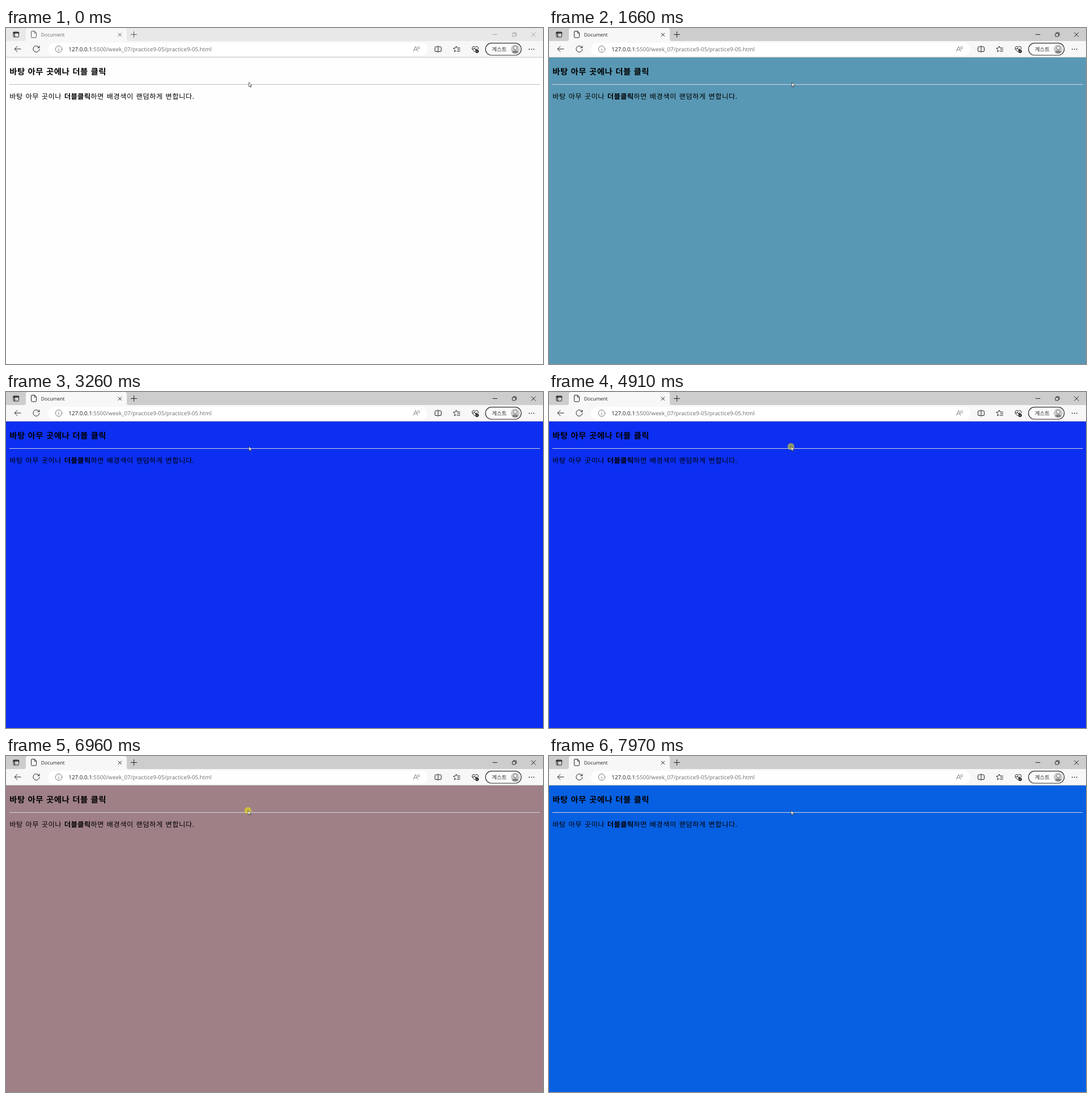
An HTML page that plays this animation: 947 by 592 pixels, repeating every 9.42 s.

```html
<!DOCTYPE html>
<html lang="ko">
<head>
<meta charset="utf-8">
<title>Document</title>
<style>
html, body { margin: 0; width: 100%; height: 100%; overflow: hidden; background: #fff; }
svg { display: block; width: 947px; height: 592px; }
text { font-family: "Open Sans", "Noto Sans", sans-serif; text-rendering: geometricPrecision; }
.ko { font-family: "Noto Sans CJK KR", "Noto Sans CJK", sans-serif; fill: #000; }
.line { fill: none; stroke: #222; stroke-width: 1; stroke-linecap: round; stroke-linejoin: round; }
#page, #rule, #bar, #label, #tabIcons, #buttons, #dot, #pointer {
  animation: 9420ms step-end infinite;
}

/* Page colour changes when the second click is released */
#page { animation-name: page; }
@keyframes page {
  0% { fill: #fefefe; }
  8.383% { fill: #3b5ba4; }
  17.619% { fill: #5998b5; }
  34.604% { fill: #0c2ff2; }
  54.986% { fill: #15cf1c; }
  64.859% { fill: #9f8087; }
  75.369% { fill: #6f8a8c; }
  84.604%, 100% { fill: #0760e2; }
}
#rule { animation-name: rule; }
@keyframes rule {
  0% { fill: #bcbcbc; }
  8.383%, 100% { fill: #d2d6dd; }
}

/* The window gains focus */
#bar { animation-name: bar; }
@keyframes bar {
  0% { fill: #e8e8e8; }
  .74%, 100% { fill: #cdcdcd; }
}
#label { animation-name: label; }
@keyframes label {
  0% { fill: #6d6d6d; }
  .74%, 100% { fill: #222; }
}
#tabIcons { animation-name: tabIcons; }
@keyframes tabIcons {
  0% { stroke: #555; }
  .74%, 100% { stroke: #222; }
}
#buttons { animation-name: buttons; }
@keyframes buttons {
  0% { stroke: #a0a0a0; }
  .74%, 100% { stroke: #222; }
}

/* Highlight while the mouse button is down */
#dot { animation-name: press; }
@keyframes press {
  0%, 8.383%, 14.753%, 17.619%, 23.245%, 25.369%, 34.604%, 40.867%,
  52.863%, 54.986%, 64.859%, 72.608%, 75.369%, 82.481%, 84.604%, 100% { opacity: 0; }
  7.64%, 14.116%, 16.876%, 22.502%, 24.625%, 33.755%, 40.231%,
  52.12%, 54.243%, 64.116%, 71.865%, 73.882%, 81.738%, 83.861% { opacity: .55; }
}
#pointer { animation-name: drift; }
@keyframes drift {
  0% { transform: translate(0, 0); }
  52.12%, 100% { transform: translate(-1.4px, 0); }
}
</style>
</head>
<body>
<svg viewBox="0 0 947 592">
  <rect id="page" y="52" width="947" height="540"/>
  <rect id="rule" x="6" y="99" width="935.5" height="1"/>
  <text class="ko" x="6.2" y="81.8" font-size="14.4" font-weight="700" letter-spacing=".5" word-spacing=".4">바탕 아무 곳에나 더블 클릭</text>
  <text class="ko" x="6.2" y="124.5" font-size="12.3" letter-spacing=".5" word-spacing=".7">바탕 아무 곳이나 <tspan font-weight="700" letter-spacing=".3">더블클릭</tspan>하면 배경색이 랜덤하게 변합니다.</text>

  <!-- Tab strip -->
  <rect id="bar" width="947" height="23"/>
  <path d="M32 23Q35 23 35 20V4Q35 0 39 0H209Q213 0 213 4V20Q213 23 216 23Z" fill="#f7f7f7"/>
  <g class="line">
    <rect x="13" y="7" width="9.5" height="9" rx="1.5"/>
    <path d="M13 8.6H22.5" stroke-width="2"/>
    <path d="M15.2 9V15.5" stroke-width="1.2"/>
  </g>
  <g id="tabIcons" class="line">
    <path d="M46 5.5H50.5L53.5 8.8V15.5Q53.5 17 52 17H46Q44.5 17 44.5 15.5V7Q44.5 5.5 46 5.5ZM50.3 5.7V9H53.4"/>
    <path d="M198 9L203.6 14.6M203.6 9L198 14.6"/>
    <path d="M220.5 11.5H230.5M225.5 6.5V16.5"/>
  </g>
  <text id="label" x="61.7" y="14.7" font-size="8.6">Document</text>
  <g id="buttons" class="line">
    <path d="M858.5 11.5H866"/>
    <rect x="893" y="9.5" width="5.5" height="5.5" rx=".8"/>
    <path d="M894.8 8H898.5Q900 8 900 9.5V13.2"/>
    <path d="M926.5 8L933.8 15.3M933.8 8L926.5 15.3"/>
  </g>

  <!-- Toolbar -->
  <rect y="23" width="947" height="28.5" fill="#f7f7f7"/>
  <rect y="51" width="947" height="1" fill="#c4c4c4"/>
  <rect x="74" y="26" width="669" height="23" rx="11.5" fill="#fff"/>
  <g class="line">
    <path d="M26 37H15.2M20 32.2L15.2 37L20 41.8"/>
    <path d="M58.3 34.5A5.5 5.5 0 1 0 58.9 37.5M58.8 31.8V34.8H55.7"/>
  </g>
  <g class="line" style="stroke:#666;stroke-width:.9">
    <circle cx="93" cy="37.3" r="5.7"/>
    <path d="M93 36.8V40M93 34.5V34.6"/>
  </g>
  <text x="110.3" y="40.9" font-size="9.8" fill="#6d6d6d"><tspan fill="#1c1c1c">127.0.0.1</tspan>:5500/week_07/practice9-05/practice9-05.html</text>
  <g class="line" style="stroke:#777;stroke-width:.9">
    <path d="M718.5 41L722.3 32.5L726 41M719.8 38.3H724.8M725.5 33.5Q727 35 726.3 36.8M727.6 32Q730 34.3 728.9 37.2"/>
  </g>
  <g class="line">
    <path d="M761 33H758Q756.5 33 756.5 34.5V40Q756.5 41.5 758 41.5H761M763 33H766Q767.5 33 767.5 34.5V40Q767.5 41.5 766 41.5H763M762 31.5V43"/>
    <path d="M793.5 40.3L790.8 41.9L791.5 38.3L788.9 35.7L792.4 35.2L794 32L795.6 35.2H800.5M796.5 38H800.5M795.5 41H800.5"/>
    <path d="M827 42.3L822.8 38.2Q820.8 35.5 822.8 33.3Q825 31.5 827.3 33.6Q829.8 31.4 832 33.3Q833.6 35 832.7 37M822.5 37H825L826.2 35L828 38.8L829 37H830.5"/>
    <circle cx="830.7" cy="41" r="2.7" fill="#222"/>
    <path d="M829.5 41L830.4 41.9L832 40.2" style="stroke:#fff;stroke-width:.8"/>
  </g>
  <rect x="845.6" y="26.6" width="63" height="21.4" rx="10.7" fill="#fbfbfb" stroke="#303030" stroke-width="1.2"/>
  <text class="ko" x="856.7" y="40.5" font-size="9.5" style="fill:#222">게스트</text>
  <circle cx="898" cy="37.3" r="8" fill="#cbcbcb"/>
  <path d="M892.5 43Q892.5 39.5 898 39.5T903.5 43Q898 47 892.5 43Z" fill="#858585"/>
  <circle cx="898" cy="35" r="3.2" fill="#eee" stroke="#777"/>
  <g fill="#222">
    <circle cx="922.7" cy="37.4" r=".9"/>
    <circle cx="926.7" cy="37.4" r=".9"/>
    <circle cx="930.7" cy="37.4" r=".9"/>
  </g>

  <g id="pointer">
    <circle id="dot" cx="428" cy="96" r="6" fill="#f4f000"/>
    <path d="M428.3 95.7V103.5L430.1 101.9L431.3 104.6L432.5 104L431.3 101.4H433.6Z" fill="#fff" stroke="#222" stroke-width=".7" stroke-linejoin="round"/>
  </g>
</svg>
</body>
</html>
```
